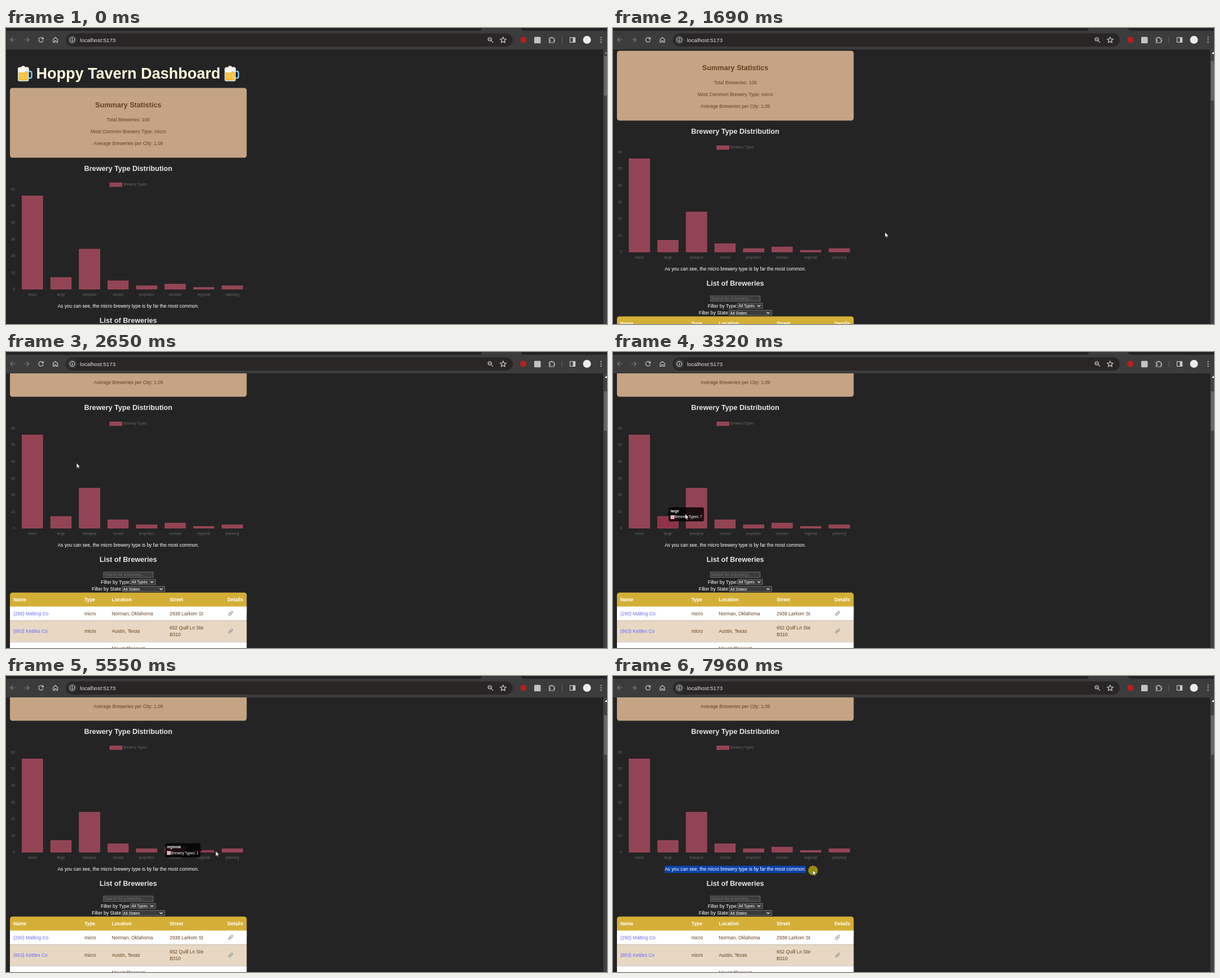
Write an HTML page that moves like this. It is 1065 px wide and 526 px high and loops after 8000 ms.

```html
<!DOCTYPE html>
<html lang="en">
<head>
<meta charset="utf-8">
<title>Dashboard</title>
<style>
  html, body { margin: 0; width: 100%; height: 100%; overflow: hidden; background: #242424; }
  svg { display: block; width: 1065px; height: 526px; font-family: "Liberation Sans", Arial, sans-serif; }
</style>
</head>
<body>
<svg id="stage" viewBox="0 0 1065 526"></svg>
<script>
const LOOP = 8000, TICK = 69.1, TICK_ORIGIN = 2144;
const PAGE_CENTER = 216.7, BASE = 8.42, HEADING = 12.63, SMALL = 6.3, CONTROL = 7;
const BROWN = '#654321', PALE = '#e6e6e6';
const AXIS_Y = 464, UNIT = 2.958, BAR_W = 36.4;

const bars = [['micro', 56], ['large', 7], ['brewpub', 24], ['closed', 5],
  ['proprietor', 2], ['contract', 3], ['regional', 1], ['planning', 2]]
  .map(([name, value], i) => ({ name, value, x: 46.8 + 50.6 * i, top: AXIS_Y - value * UNIT }));

// Keyframes are [tick, ...values]
const scrollKeys = [[-10, 0], [-9, 3.4], [-8, 24], [-7, 66], [-6, 108], [-5, 136], [-4, 151]];
const cursorKeys = [
  [-27, 762, 441], [-25, 678, 352], [-22, 678, 352], [-20, 610, 180], [-18, 541, 75],
  [-17, 450, 80], [-15, 366, 230], [-13, 482, 363], [-1, 482, 363],
  [3, 370, 320], [6, 200, 215], [8, 50, 180], [9, 56, 165], [11, 74, 175],
  [13, 88, 297], [15, 100, 301], [17, 128, 288], [19, 150, 270], [21, 160, 300],
  [23, 172, 314], [26, 200, 305], [29, 215, 302], [31, 225, 320], [32, 240, 305], [35, 261, 307],
  [37, 255, 310], [41, 285, 309], [43, 300, 308], [47, 345, 312], [50, 385, 311],
  [54, 417, 312], [57, 405, 311], [58, 340, 330], [59, 150, 341], [61, 121, 348],
  [65, 83, 345], [67, 83, 345], [72, 190, 342], [76, 300, 341], [79, 354, 345]];

function sample(keys, k) {
  if (k <= keys[0][0]) return keys[0].slice(1);
  const i = keys.findIndex(key => key[0] >= k);
  if (i < 0) return keys[keys.length - 1].slice(1);
  const a = keys[i - 1], b = keys[i], u = (k - a[0]) / (b[0] - a[0]);
  return a.slice(1).map((v, j) => v + (b[j + 1] - v) * u);
}

const text = (x, y, str, size = BASE, fill = BROWN, anchor = 'start', weight = 400) =>
  `<text x="${x}" y="${y}" font-size="${size}" fill="${fill}" text-anchor="${anchor}" font-weight="${weight}">${str}</text>`;
const centered = (y, str, size, fill, weight) => text(PAGE_CENTER, y, str, size, fill, 'middle', weight);
const rect = (x, y, w, h, fill, extra = '') =>
  `<rect x="${x}" y="${y}" width="${w}" height="${h}" fill="${fill}" ${extra}/>`;
const path = (d, stroke, width = 1.2, fill = 'none') =>
  `<path d="${d}" stroke="${stroke}" stroke-width="${width}" fill="${fill}"/>`;

const BAR_STYLE = 'stroke="#bd5168" stroke-width=".7"';

const beer = x => `<g transform="translate(${x} 67)">
  ${path('M19 10h3q3 0 3 3v6q0 3-3 3h-3', '#79c5ee', 2.4)}
  ${rect(1.2, 6, 18, 21, '#f6bd3c', 'rx="2" stroke="#c5e5f5" stroke-width="1.6"')}
  ${path('M6 14v9M10.2 14v9M14.4 14v9', '#fbd362', 1.6)}
  <g fill="#f7f5ee"><circle cx="4.3" cy="6.5" r="4"/><circle cx="10" cy="4.4" r="4.2"/>
  <circle cx="16.3" cy="6.3" r="4"/><rect x="1.5" y="6" width="12" height="6" rx="2"/></g></g>`;

const link = y => `<g transform="translate(398 ${y}) rotate(-45)" fill="none" stroke="#8d9196" stroke-width="1">
  <rect x="-4.8" y="-1.6" width="5.2" height="3.2" rx="1.6"/><rect x="-.4" y="-1.6" width="5.2" height="3.2" rx="1.6"/></g>`;

const select = (x, y, w, label) =>
  rect(x, y, w, 9, '#3b3b3b', 'stroke="#858585" stroke-width=".7"') +
  text(x + 1.5, y + 7, label, CONTROL, '#fff') +
  path(`M${x + w - 9} ${y + 3.4}l2.6 2.5 2.6-2.5`, '#fff', 1.1);

function pageMarkup() {
  const axis = [0, 10, 20, 30, 40, 50, 60]
    .map(v => text(16, AXIS_Y - v * UNIT + 2.3, v, SMALL, '#666', 'end')).join('');
  const chart = bars.map((b, i) =>
    rect(b.x - BAR_W / 2, b.top, BAR_W, b.value * UNIT, '#924454', `id="bar${i}" ${BAR_STYLE}`) +
    text(b.x, 476.4, b.name, SMALL, '#666', 'middle')).join('');
  const header = [[13, 'Name'], [139, 'Type'], [187.5, 'Location'], [290, 'Street'], [392.5, 'Details']]
    .map(([x, s]) => text(x, 593.5, s, BASE, '#fff', 'start', 700)).join('');
  const row = (y, name, place) =>
    text(13, y, name, BASE, '#646cff') + text(139, y, 'micro') + text(187.5, y, place) + link(y - 3);
  return beer(20.5) + beer(387) +
    centered(90, 'Hoppy Tavern Dashboard', 27, '#fff8dc', 700) +
    rect(7, 106.5, 419.5, 124, '#c4a484', 'rx="4.5"') +
    centered(140.7, 'Summary Statistics', HEADING, BROWN, 700) +
    centered(165.6, 'Total Breweries: 100') +
    centered(186.7, 'Most Common Brewery Type: micro') +
    centered(207.6, 'Average Breweries per City: 1.09') +
    centered(253.9, 'Brewery Type Distribution', HEADING, PALE, 700) +
    rect(184, 275.2, 21.4, 6.6, '#924454', BAR_STYLE) +
    text(208, 280.4, 'Brewery Types', SMALL, '#666') +
    axis + chart +
    rect(91.8, 488, 0, 13, '#0b41a8', 'id="selection"') +
    centered(497.2, 'As you can see, the micro brewery type is by far the most common.', BASE, '#fff') +
    centered(524.3, 'List of Breweries', HEADING, PALE, 700) +
    rect(172.8, 542, 88, 9.6, '#3b3b3b', 'stroke="#858585" stroke-width=".7"') +
    text(174.5, 549.2, 'Search for a brewery...', CONTROL, '#757575') +
    text(168, 562.5, 'Filter by Type:', BASE, '#fff') + select(221, 555, 44, 'All Types') +
    text(152, 575, 'Filter by State:', BASE, '#fff') + select(206.3, 567.5, 75, 'All States') +
    rect(7, 578.5, 419.5, 40, '#d4af37', 'rx="4.5"') + header +
    rect(7, 603.3, 419.5, 25, '#fff') + rect(7, 628.3, 419.5, 38, '#e8d8c3') +
    rect(7, 666.3, 419.5, 60, '#fff') +
    row(618.5, '(290) Malting Co', 'Norman, Oklahoma') + text(290, 618.5, '2938 Larkom St') +
    row(650, '(863) Kettles Co', 'Austin, Texas') +
    text(290, 643.8, '652 Quill Ln Ste') + text(290, 656.3, 'B310') +
    text(187.5, 680.5, 'Mount Pleasant,');
}

function browserMarkup() {
  const light = '#c9c9c9', dim = '#7c7c7c';
  return rect(0, 0, 1065, 38, '#3c3c3c') +
    path('M0 0H843V1Q842 5 838 5H0ZM913 0H1065V5H918Q914 5 913 1Z', 'none', 0, '#242424') +
    rect(106, 9.5, 792, 23.5, '#292626', 'rx="11.75"') +
    path('M16.5 21H8M12 17l-4 4 4 4', dim) + path('M32.5 21H41M37 17l4 4-4 4', dim) +
    path('M65.4 18.6A4.1 4.1 0 1 0 66 22.2M66.2 16.6v3h-3', light) +
    path('M83.5 20.3l4-3.6 4 3.6v5.2h-2.7v-3h-2.6v3h-2.7Z', light) +
    '<circle cx="117.5" cy="21" r="8" fill="#3c3c3c"/>' +
    '<circle cx="117.5" cy="21" r="4.4" fill="none" stroke="#e3e3e3"/>' +
    path('M117.5 20.5v3M117.5 18.4v1.1', '#e3e3e3') +
    text(131, 24.7, 'localhost:5173', 9.8, '#e3e3e3') +
    '<circle cx="857.3" cy="20" r="3" fill="none" stroke="#d0d0d0" stroke-width="1.2"/>' +
    path('M859.5 22.3l3.6 3.6M855.8 20h3', '#d0d0d0') +
    path('M881 16.2l1.5 3.3 3.6.3-2.7 2.4.8 3.6-3.2-1.9-3.2 1.9.8-3.6-2.7-2.4 3.6-.3Z', '#d0d0d0') +
    '<circle cx="916.7" cy="21" r="5.6" fill="#b5211c"/>' +
    rect(936, 15.7, 11.5, 11.5, '#c2c2c2', 'rx="1.5"') +
    path('M962.5 18h3v-1.5h2.5V18h3v3h1.3v2.3H971V26h-8.5v-2.7h1.7V21h-1.7Z', light) +
    rect(984.8, 16, 1, 10.5, '#666') +
    rect(999.5, 17, 9, 8.4, 'none', `stroke="${light}" stroke-width="1.2"`) + rect(1004.5, 17, 4, 8.4, light) +
    '<circle cx="1029.5" cy="21" r="7" fill="#eeecec"/>' +
    [16.8, 21, 25.2].map(y => `<circle cx="1054.5" cy="${y}" r="1.1" fill="${light}"/>`).join('') +
    rect(1058.5, 38, 6.5, 488, '#424242') +
    '<path id="upArrow" d="M1061 46l3-3.5 3 3.5Z"/>' +
    rect(1059.5, 50, 5.5, 70, '#686868', 'id="thumb"');
}

const stage = document.getElementById('stage');
stage.innerHTML = rect(0, 0, 1065, 526, '#242424') +
  `<g id="page">${pageMarkup()}<g id="tooltip"></g></g>${browserMarkup()}
  <circle id="press" r="8.6" fill="#f5ea00" opacity=".54"/>
  <path id="arrow" d="M0 0V8.6L2 6.8 3.3 9.7 4.8 9 3.5 6.2H6.2Z" fill="#fff" stroke="#111" stroke-width=".5"/>
  <path id="beam" d="M-2-4.2h1.4L0-3.7 .6-4.2H2M0-3.7V3.7M-2 4.2h1.4L0 3.7 .6 4.2H2" fill="none" stroke="#ddd" stroke-width=".9"/>`;

const el = id => document.getElementById(id);
const show = (node, visible) => node.setAttribute('visibility', visible ? 'visible' : 'hidden');
const move = (node, x, y) => node.setAttribute('transform', `translate(${x} ${y})`);

function barUnderCursor(k) {
  const [x, y] = sample(cursorKeys, k), pageY = y + sample(scrollKeys, k)[0];
  return bars.find(b => Math.abs(x - b.x) < BAR_W / 2 && pageY >= b.top && pageY <= AXIS_Y);
}

// The tooltip chases the hovered bar and fades when nothing is hovered.
function tooltipAt(k) {
  const tip = { opacity: 0, bar: null, hovered: null };
  for (let i = 0; i <= k; i++) {
    const bar = tip.hovered = barUnderCursor(i - 1);
    if (!bar) { tip.opacity = Math.max(0, tip.opacity - .3); continue; }
    const width = bar.value > 9 ? 66 : 62.5;
    const x = bar.x < PAGE_CENTER ? bar.x + 2.6 : bar.x - 2.6 - width, y = bar.top - 12.5;
    tip.x = tip.bar ? tip.x + (x - tip.x) * .6 : x;
    tip.y = tip.bar ? tip.y + (y - tip.y) * .6 : y;
    Object.assign(tip, { bar, width, opacity: Math.min(1, tip.opacity + .4) });
  }
  return tip;
}

function drawTooltip(tip) {
  const node = el('tooltip');
  node.setAttribute('opacity', tip.opacity);
  if (!tip.bar) { node.innerHTML = ''; return; }
  const { x, y, width: w, bar } = tip;
  const onLeft = bar.x < PAGE_CENTER, edge = onLeft ? x : x + w, reach = onLeft ? -2.6 : 2.6;
  node.innerHTML = `<g fill-opacity=".8">${rect(x, y, w, 25, '#000', 'rx="3"')}
    <path d="M${edge} ${y + 9.9}l${reach} 2.6 ${-reach} 2.6Z"/></g>` +
    text(x + 3.2, y + 8.8, bar.name, SMALL, '#fff', 'start', 700) +
    rect(x + 3.6, y + 14.3, 6.2, 6.2, '#f3a3b3', 'stroke="#fff" stroke-width=".5"') +
    text(x + 10.6, y + 19.4, `Brewery Types: ${bar.value}`, SMALL, '#fff');
}

function render(t) {
  const k = Math.floor((t - TICK_ORIGIN) / TICK);
  const [scroll] = sample(scrollKeys, k), [x, y] = sample(cursorKeys, k);
  move(el('page'), 0, -scroll);
  el('thumb').setAttribute('y', 50 + scroll * .132);
  el('upArrow').setAttribute('fill', scroll > 4 ? '#fff' : '#868686');

  const tip = tooltipAt(k);
  bars.forEach((b, i) => el('bar' + i).setAttribute('fill',
    b === tip.hovered || (b === tip.bar && tip.opacity > .65) ? '#8f3248' : '#924454'));
  drawTooltip(tip);

  el('selection').setAttribute('width', k < 68 ? 0 : Math.max(0, Math.min(249.8, x - 91.8)));
  const overText = k > 50 && x > 92 && x < 342 && y > 336 && y < 350;
  show(el('arrow'), t >= 320 && !overText);
  show(el('beam'), overText);
  show(el('press'), (k >= 68 && k < 80) || k >= 84);
  move(el('arrow'), x, y);
  move(el('beam'), x, y);
  move(el('press'), x + .5, y + .5);
}

const start = performance.now();
function loop() {
  render((performance.now() - start) % LOOP);
  requestAnimationFrame(loop);
}
loop();
</script>
</body>
</html>
```
